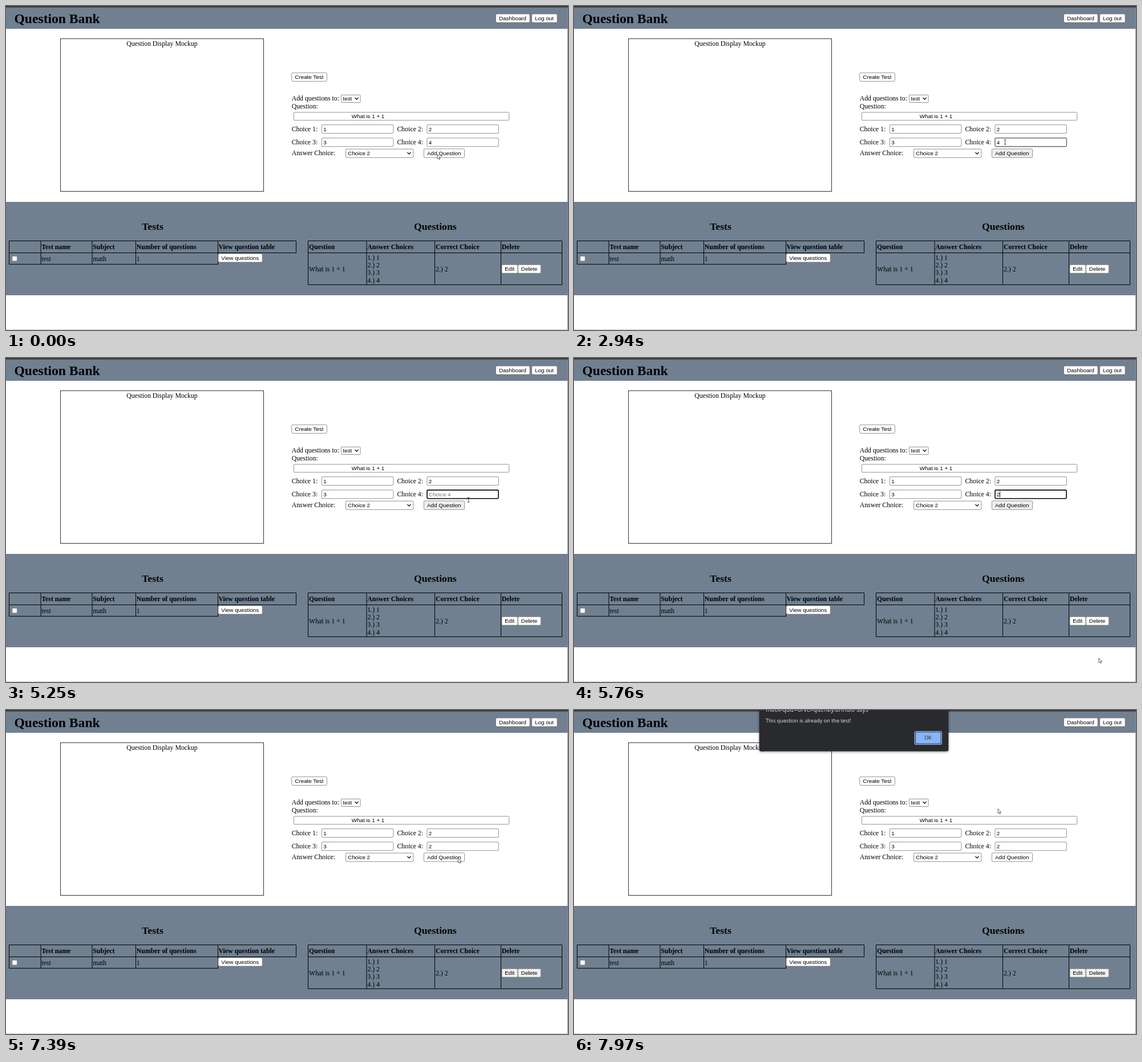
Write an HTML page that moves like this. It is 985 px wide and 569 px high and loops after 8 s.

```html
<!DOCTYPE html>
<html lang="en">
<head>
<meta charset="utf-8">
<title>Question Bank</title>
<style>
  html, body { margin: 0; width: 100%; height: 100%; overflow: hidden; background: #fff; }
  svg { display: block; width: 985px; height: 569px; }
  text { font: 11.8px "Liberation Serif", "Times New Roman", serif; fill: #000; white-space: pre; }
  .b { font-weight: bold; }
  .h1 { font-size: 23.6px; font-weight: bold; }
  .h2 { font-size: 17.7px; font-weight: bold; text-anchor: middle; }
  .mid { text-anchor: middle; }
  .ui text, text.ui { font: 9.84px "Liberation Sans", Arial, sans-serif; }
  .ui rect { fill: #fff; stroke: #767676; stroke-width: .8; }
  .line { fill: none; stroke: #000; stroke-width: 1; }
  .chev { fill: none; stroke: #111; stroke-width: 1.3; }
  .dialog text { font: 9.1px "Open Sans", "Noto Sans", sans-serif; fill: #e8eaed; }
  .dialog .host { font-size: 10.3px; }
  .dialog .ok { fill: #202124; text-anchor: middle; }

  /* 1% of the loop is 80 ms */
  .state { animation: 8s step-end infinite; }
  .add { animation-name: add; }
  .row { animation-name: row; }
  .hover { animation-name: hover; }
  .focus { animation-name: focus; }
  .four { animation-name: four; }
  .hint { animation-name: hint; }
  .two { animation-name: two; }
  .caret { animation-name: caret; }
  .arrow { animation-name: arrow; }
  .beam { animation-name: beam; }
  .pointer { animation: move 8s linear infinite; }
  .dialog { animation: drop 8s linear infinite; filter: drop-shadow(0 1px 2px rgba(0, 0, 0, .45)); }
  .ui text.hint { fill: #757575; }

  @keyframes add {
    0%, 29.6%, 39.2%, 92% { fill: #fff; }
    2.6%, 34%, 48.75% { fill: #efefef; }
    100% { fill: #fff; }
  }
  @keyframes row {
    0% { fill: #fff; }
    87.875%, 100% { fill: #efefef; }
  }
  @keyframes hover {
    0%, 39.2%, 53.125%, 100% { visibility: hidden; }
    34%, 48.75% { visibility: visible; }
  }
  @keyframes focus {
    0%, 92.375%, 100% { visibility: hidden; }
    53.125% { visibility: visible; }
  }
  @keyframes four {
    0% { visibility: visible; }
    62.875%, 100% { visibility: hidden; }
  }
  @keyframes hint {
    0%, 70.25%, 100% { visibility: hidden; }
    62.875% { visibility: visible; }
  }
  @keyframes two {
    0% { visibility: hidden; }
    70.25%, 100% { visibility: visible; }
  }
  @keyframes caret {
    0%, 59.75%, 76.875%, 90.125%, 100% { visibility: hidden; }
    53.125%, 70.25%, 83.5% { visibility: visible; }
  }
  @keyframes arrow {
    0%, 39.2%, 65.8%, 100% { visibility: visible; }
    34%, 48.75% { visibility: hidden; }
  }
  @keyframes beam {
    0%, 39.2%, 65.8%, 100% { visibility: hidden; }
    34%, 48.75% { visibility: visible; }
  }
  @keyframes move {
    0%, .3% { transform: translate(756px, 260.5px); }
    3.875%, 28% { transform: translate(775.5px, 272px); }
    32.5% { transform: translate(768px, 256px); }
    36.75% { transform: translate(755.5px, 239px); }
    37.875%, 38.125% { transform: translate(757px, 241px); }
    39.625%, 48.25% { transform: translate(772px, 254px); }
    49.375%, 62.75% { transform: translate(792px, 242px); }
    65.625% { transform: translate(810.5px, 249px); animation-timing-function: ease-in-out; }
    72.75% { transform: translate(922px, 533px); }
    75%, 84.8% { transform: translate(924px, 575px); }
    84.85% { transform: translate(963px, 557px); animation-timing-function: ease-in-out; }
    92.375%, 97.9% { transform: translate(792.5px, 260px); }
    99.6%, 100% { transform: translate(743px, 173.5px); }
  }
  @keyframes drop {
    0%, 93.25% { opacity: 0; transform: translateY(-18px); }
    94.75% { opacity: .55; transform: translateY(-8px); }
    95.875%, 100% { opacity: 1; transform: none; }
  }
</style>
</head>
<body>
<svg viewBox="0 0 985 569">
  <!-- page -->
  <rect width="985" height="569" fill="#fff"/>
  <rect y="2" width="984" height="38" fill="#708090"/>
  <rect y="344" width="984" height="164" fill="#708090"/>
  <rect width="985" height="2.5" fill="#37373d"/>
  <rect x="984" y="2" width="1" height="567" fill="#8583a0"/>
  <rect y="568" width="985" height="1" fill="#c8c8cc"/>

  <text class="h1" x="14.5" y="30">Question Bank</text>
  <rect class="line" x="95.5" y="57.5" width="356" height="268" stroke-opacity=".8"/>
  <text class="mid" x="273.5" y="69.5">Question Display Mockup</text>

  <g class="ui">
    <rect x="858.5" y="14" width="59.5" height="15" rx="2"/><text x="864" y="24.7">Dashboard</text>
    <rect x="921.5" y="14" width="44.5" height="15" rx="2"/><text x="927" y="24.7">Log out</text>
    <rect x="500.9" y="117.3" width="61.5" height="15" rx="2"/><text x="506.3" y="128.2">Create Test</text>
  </g>

  <!-- form -->
  <text x="500.7" y="166.3">Add questions to:</text>
  <text x="500.7" y="179.7">Question:</text>
  <text x="500.7" y="219.5">Choice 1:</text>
  <text x="685.5" y="219.5">Choice 2:</text>
  <text x="500.7" y="242.7">Choice 3:</text>
  <text x="685.5" y="242.7">Choice 4:</text>
  <text x="500.7" y="261.5">Answer Choice:</text>
  <g class="ui">
    <rect x="587.5" y="156.2" width="33.5" height="13.3" rx="1"/><text x="590.5" y="166.2">test</text>
    <rect x="504.4" y="186.7" width="377.3" height="14" rx="1.5"/><text x="605.7" y="197">What is 1 + 1</text>
    <rect x="553.4" y="208.6" width="125.5" height="15" rx="1.5"/><text x="556.2" y="219.5">1</text>
    <rect x="737.9" y="208.6" width="125.5" height="15" rx="1.5"/><text x="740.8" y="219.5">2</text>
    <rect x="553.4" y="231.8" width="125.5" height="15" rx="1.5"/><text x="556.2" y="242.7">3</text>
    <rect x="737.9" y="231.8" width="125.5" height="15" rx="1.5"/>
    <text class="state four" x="740.8" y="242.7">4</text>
    <text class="state hint" x="740.8" y="242.7">Choice 4</text>
    <text class="state two" x="740.8" y="242.7">2</text>
    <rect x="595.6" y="251.2" width="118" height="15" rx="1"/><text x="599.3" y="262">Choice 2</text>
    <rect class="state add" x="732.4" y="250.9" width="71.2" height="15.2" rx="2"/><text x="738" y="262">Add Question</text>
  </g>
  <path class="chev" d="M611.5 161l3 3l3-3M703.5 257l3 3l3-3"/>
  <rect class="state hover" x="737.9" y="231.8" width="125.5" height="15" rx="1.5" fill="none" stroke="#444" stroke-width=".9"/>
  <rect class="state focus" x="738" y="231.9" width="125" height="14.8" rx="1.5" fill="none" stroke="#101010" stroke-width="1.6"/>
  <rect class="state caret" x="746.1" y="234" width=".9" height="10.5"/>

  <!-- tests -->
  <text class="h2" x="257" y="393">Tests</text>
  <path class="line" d="M5.5 412.5H508.5V433.5H5.5M5.5 412V453.5H371.5V412M61 412V453.5M151 412V453.5M227.5 412V453.5"/>
  <g class="b">
    <text class="b" x="62.3" y="427">Test name</text>
    <text class="b" x="152.3" y="427">Subject</text>
    <text class="b" x="228.8" y="427">Number of questions</text>
    <text class="b" x="372.5" y="427">View question table</text>
  </g>
  <text x="62.3" y="447.5">test</text>
  <text x="152.3" y="447.5">math</text>
  <text x="228.8" y="447.5">1</text>
  <g class="ui">
    <rect x="10.8" y="439.3" width="8.6" height="8.6" rx="1.5"/>
    <rect x="371.9" y="434.9" width="77.3" height="15" rx="2"/><text x="377.3" y="445.8">View questions</text>
  </g>

  <!-- questions -->
  <text class="h2" x="752.3" y="393">Questions</text>
  <path class="line" d="M529.5 412.5H974.5V489.5H529.5ZM529.5 433.5H974.5M632 412V489.5M751.5 412V489.5M867.5 412V489.5"/>
  <text class="b" x="531" y="427">Question</text>
  <text class="b" x="633.3" y="427">Answer Choices</text>
  <text class="b" x="753" y="427">Correct Choice</text>
  <text class="b" x="868.7" y="427">Delete</text>
  <text x="531" y="465.5">What is 1 + 1</text>
  <text x="633.3" y="446">1.) 1</text>
  <text x="633.3" y="459.2">2.) 2</text>
  <text x="633.3" y="472.4">3.) 3</text>
  <text x="633.3" y="485.6">4.) 4</text>
  <text x="753" y="465.5">2.) 2</text>
  <g class="ui">
    <rect class="state row" x="868.9" y="454.3" width="28" height="15" rx="2"/><text x="874.2" y="465.2">Edit</text>
    <rect class="state row" x="897.4" y="454.3" width="40" height="15" rx="2"/><text x="902.8" y="465.2">Delete</text>
  </g>

  <!-- alert -->
  <g class="dialog">
    <rect x="324.7" y="-40" width="331.6" height="112.6" rx="3" fill="#292a2d"/>
    <text class="host" x="336" y="2.6">mock-quiz--orvel-quenby.brindlo says</text>
    <text x="336" y="21.5">This question is already on the test!</text>
    <rect x="597.2" y="37.6" width="47.2" height="22.8" rx="3" fill="#26334a" stroke="#9dc0fa" stroke-width="1.2"/>
    <rect x="598.9" y="39.3" width="43.8" height="19.4" rx="2" fill="#8ab4f8"/>
    <text class="ok" x="620.3" y="52.3">OK</text>
  </g>

  <!-- pointer -->
  <g class="pointer">
    <path class="state arrow" d="M0 0V8L1.8 6.4L3.1 9.2L4.4 8.6L3.2 6H5.6Z" fill="#fff" stroke="#222" stroke-width=".7"/>
    <path class="state beam" d="M-2-4H-.5L0-3.6L.5-4H2M0-3.6V3.6M-2 4H-.5L0 3.6L.5 4H2" fill="none" stroke="#222" stroke-width=".9"/>
  </g>
</svg>
</body>
</html>
```
